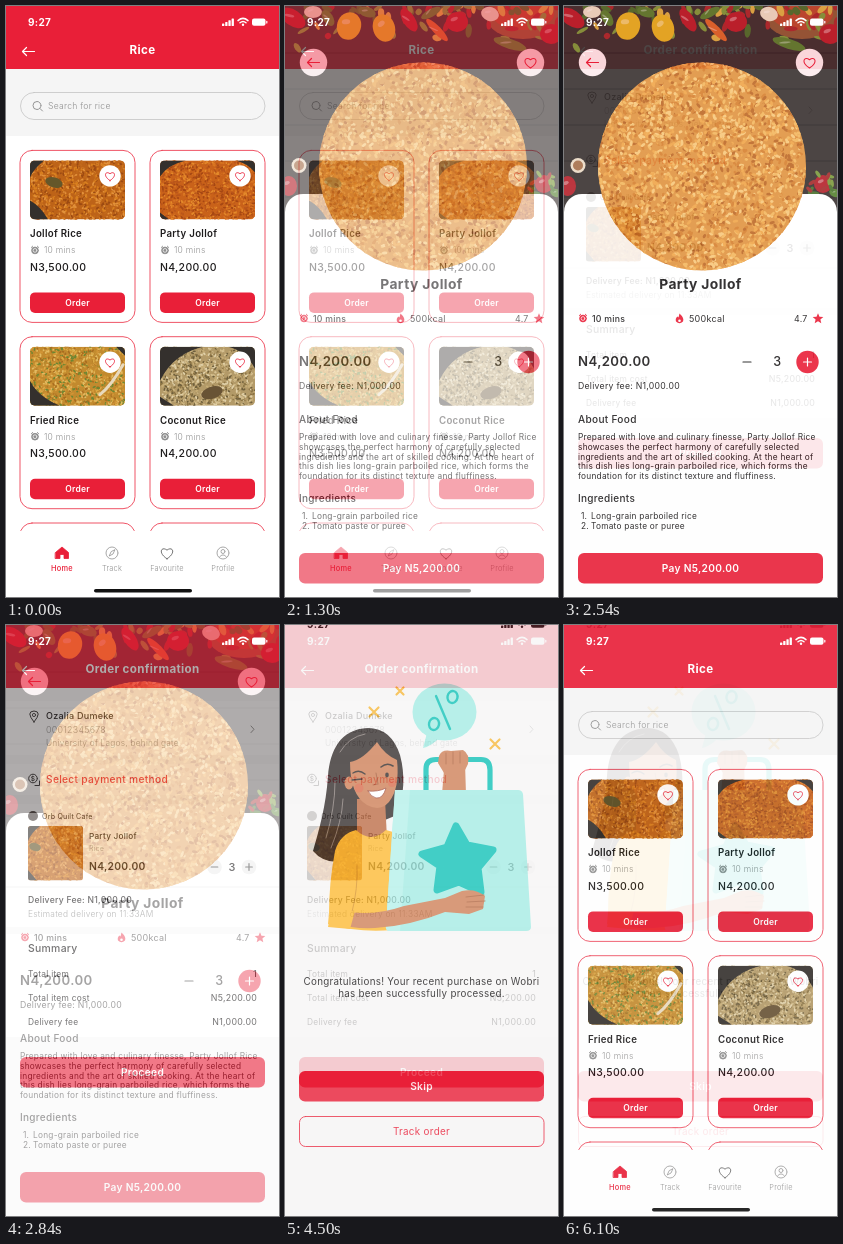
An HTML page with a canvas that plays this animation: 273 px wide and 591 px high, repeating every 6.16 s.

```html
<!DOCTYPE html>
<html lang="en">
<head>
<meta charset="utf-8">
<title>Food ordering screens</title>
<style>
html, body { margin: 0; width: 100%; height: 100%; overflow: hidden; background: #fff; }
canvas { display: block; width: 100%; height: 100%; }
</style>
</head>
<body>
<canvas id="stage"></canvas>
<script>
const W = 273, H = 591;
const HOLD = 1000, STEP = 60, SPAN = 1540;
const RED = '#e91f38', INK = '#1e1c1d', GREY = '#929292', PALE = '#f5f5f5';
const SKIN = '#cf8259', TEAL = '#14c3b8', MINT = '#a6ece4', HAIR = '#37302f', GOLD = '#fdbb36';
const dpr = window.devicePixelRatio || 1;
let g;

function prepare(canvas) {
  canvas.width = Math.round(W * dpr);
  canvas.height = Math.round(H * dpr);
  const ctx = canvas.getContext('2d');
  ctx.scale(dpr, dpr);
  return ctx;
}

function layer(paint) {
  const canvas = document.createElement('canvas');
  g = prepare(canvas);
  g.lineCap = g.lineJoin = 'round';
  paint();
  return canvas;
}

function randomizer(seed) {
  return () => (seed = (seed * 16807) % 2147483647) / 2147483647;
}

function text(s, x, y, size, weight = 400, color = INK, align = 'left') {
  g.font = `${weight} ${size}px Inter, "DejaVu Sans", sans-serif`;
  g.letterSpacing = (size * 0.03).toFixed(2) + 'px';
  g.textAlign = align;
  g.fillStyle = color;
  g.fillText(s, x, y);
}

function ink(p, fill, stroke, width = 1) {
  if (fill) { g.fillStyle = fill; g.fill(p); }
  if (stroke) { g.strokeStyle = stroke; g.lineWidth = width; g.stroke(p); }
}

function path(d, fill, stroke, width) { ink(new Path2D(d), fill, stroke, width); }

function box(x, y, w, h, r, fill, stroke, width) {
  const p = new Path2D();
  p.roundRect(x, y, w, h, r);
  ink(p, fill, stroke, width);
  return p;
}

function oval(x, y, rx, ry, turn, fill, stroke, width) {
  const p = new Path2D();
  p.ellipse(x, y, rx, ry, turn, 0, 7);
  ink(p, fill, stroke, width);
  return p;
}

function disc(x, y, r, fill, stroke, width) { return oval(x, y, r, r, 0, fill, stroke, width); }

function at(x, y, scale, draw) {
  g.save();
  g.translate(x, y);
  g.scale(scale, scale);
  draw();
  g.restore();
}

function inside(p, draw) {
  g.save();
  g.clip(p);
  draw();
  g.restore();
}

// ---- icons ----
function heart(x, y, scale, color, width = 1) {
  at(x, y, scale, () => path('M0 4.4C-8-.6-4.6-6.4 0-2.8C4.6-6.4 8-.6 0 4.4Z', null, color, width));
}

function arrow(x, y, color) {
  path(`M${x + 6} ${y}H${x - 6}M${x - 2} ${y - 4}L${x - 6} ${y}L${x - 2} ${y + 4}`, null, color, 1.2);
}

function sign(x, y, plus, color, r = 4) {
  path(`M${x - r} ${y}H${x + r}` + (plus ? `M${x} ${y - r}V${y + r}` : ''), null, color, 1.2);
}

function star(x, y, r, color) {
  let d = '';
  for (let i = 0; i < 10; i++) {
    const a = i * Math.PI / 5, k = i % 2 ? r * 0.45 : r;
    d += `${i ? 'L' : 'M'}${x + k * Math.sin(a)} ${y - k * Math.cos(a)}`;
  }
  path(d + 'Z', color);
}

function timer(x, y, color) {
  disc(x, y, 3.4, color, color, 0.8);
  disc(x, y, 1.9, null, '#fff', 0.7);
  path(`M${x - 3.6} ${y - 3}l1.2-1.2M${x + 3.6} ${y - 3}l-1.2-1.2`, null, color, 1);
}

function status(color, dy = 0) {
  g.save();
  g.translate(0, dy);
  text('9:27', 22, 20, 10, 700, color);
  for (let i = 0; i < 4; i++) box(216 + i * 3.2, 17.6 - i * 1.7, 2.3, 2.4 + i * 1.7, 0.6, color);
  path('M232 14.6Q237 10.2 242 14.6M234 16.8Q237 14.2 240 16.8', null, color, 1.5);
  disc(237, 18.7, 1.2, color);
  box(246, 12.6, 13.5, 7.2, 2, color);
  box(260.2, 14.8, 1.2, 2.8, 0.6, color);
  g.restore();
}

function header(title) {
  g.fillStyle = RED;
  g.fillRect(0, 0, W, 63);
  status('#fff');
  arrow(22.5, 45.5, '#fff');
  text(title, W / 2, 48, 11.6, 700, '#fff', 'center');
}

function button(label, y, size = 10.2) {
  box(14, y, 245, 30.5, 6, RED);
  text(label, W / 2, y + 18.7, size, 600, '#fff', 'center');
}

// ---- food pictures ----
function grains(x, y, w, h, colors, seed, size = 1.6) {
  const rnd = randomizer(seed);
  g.fillStyle = colors[0];
  g.fillRect(x, y, w, h);
  for (let n = w * h / (size * size * 1.7); n > 0; n--) {
    const c = colors[Math.floor(rnd() * colors.length)];
    oval(x + rnd() * w, y + rnd() * h, size * (0.6 + rnd() * 0.6), size * 0.55, rnd() * 3.1, c);
  }
}

const DISHES = [
  { name: 'Jollof Rice', price: 'N3,500.00', seed: 11,
    colors: ['#bd6318', '#d9801f', '#9c4a12', '#e2913a', '#c26a1b'],
    pan: 'M0 0H14Q3 9 0 17ZM0 40Q11 46 18 59H0Z' },
  { name: 'Party Jollof', price: 'N4,200.00', seed: 23,
    colors: ['#c9621a', '#e48a2b', '#a64713', '#d97622', '#b9551a'],
    pan: 'M0 0H26Q8 4 0 16ZM76 0H95V12Q88 3 76 0ZM0 52L9 59H0Z' },
  { name: 'Fried Rice', price: 'N3,500.00', seed: 37,
    colors: ['#c28a2e', '#dcaa45', '#a86c1f', '#6d8632', '#d29537', '#e3bb62'],
    pan: 'M0 34Q8 50 30 59H0ZM86 0H95V9Z' },
  { name: 'Coconut Rice', price: 'N4,200.00', seed: 53,
    colors: ['#b39a68', '#d3bd8c', '#8c7444', '#c7ad76', '#e0d0a8', '#6f5f3c'],
    pan: 'M0 0H44Q14 6 0 34ZM68 0H95V22Q86 4 68 0ZM0 50L14 59H0Z' }
];

function dishPhoto(dish, x, y) {
  inside(box(x, y, 95, 59, 5), () => {
    grains(x, y, 95, 59, dish.colors, dish.seed);
    at(x, y, 1, () => path(dish.pan, '#34302d'));
    if (dish.seed === 11) oval(x + 24, y + 22, 9, 5, 0.3, '#65572a');
    if (dish.seed === 37) path(`M${x + 70} ${y + 48}Q${x + 82} ${y + 38} ${x + 93} ${y + 18}`, null, '#e8d9bd', 3);
    if (dish.seed === 53) oval(x + 52, y + 46, 11, 6, -0.3, '#685335');
  });
}

function card(dish, x, y) {
  box(x, y, 115, 172, 12, '#fff', '#ee4256', 0.9);
  if (!dish) return;
  dishPhoto(dish, x + 10, y + 10);
  disc(x + 90, y + 25.5, 10.7, '#fff');
  heart(x + 90, y + 26, 0.95, RED, 0.9);
  text(dish.name, x + 10, y + 87, 9.7, 600);
  timer(x + 15, y + 100, '#8f8f8f');
  text('10 mins', x + 24, y + 103, 8.5, 300, GREY);
  text(dish.price, x + 10, y + 120.7, 10.5, 500);
  box(x + 10, y + 142, 95, 20.5, 5, RED);
  text('Order', x + 57.5, y + 155.3, 8.5, 600, '#fff', 'center');
}

// ---- screens ----
function menu() {
  g.fillStyle = '#fff';
  g.fillRect(0, 0, W, H);
  g.fillStyle = PALE;
  g.fillRect(0, 63, W, 67);
  header('Rice');
  box(14.5, 86.5, 244.5, 27, 13.5, null, '#c4c4c4', 0.8);
  disc(31, 99.5, 4, null, '#8a8a8a', 0.9);
  path('M34 102.5L36.5 105', null, '#8a8a8a', 0.9);
  text('Search for rice', 42, 103, 8.6, 300, GREY);
  for (let i = 0; i < 6; i++) card(DISHES[i], 14 + 130 * (i % 2), 144.4 + 186.3 * Math.floor(i / 2));

  g.fillStyle = '#fff';
  g.fillRect(0, 525, W, 66);
  path('M49.5 546.5L56 541L62.500 546.5V552.500H58V548.500H54V552.500H49.500Z', RED, RED, 0.8);
  disc(106, 547, 6, null, GREY, 0.8);
  path('M108.800 544L107 548L103.200 550L105 546Z', null, GREY, 0.8);
  heart(161, 547.5, 1.2, '#6d6d6d', 0.8);
  disc(217, 547, 6, null, GREY, 0.8);
  disc(217, 545.5, 2, null, GREY, 0.8);
  path('M213.500 551Q217 546.500 220.500 551', null, GREY, 0.8);
  ['Home', 'Track', 'Favourite', 'Profile'].forEach((s, i) =>
    text(s, [56, 106, 161, 217][i], 565, 7.4, i ? 300 : 500, i ? GREY : RED, 'center'));
  box(88, 583, 98, 3.6, 1.8, '#111');
}

// x, y, width, height, turn for each colour
const VEG = {
  '#b5202a': [[8, 12, 14, 8, 0.6], [124, 14, 13, 6, 1], [172, 16, 11, 10, 0], [266, 28, 11, 10, 0], [259, 178, 9, 9, 0], [4, 180, 8, 10, 0]],
  '#e3b322': [[64, 20, 12, 14, 0.3], [99, 22, 11, 14, -0.3]],
  '#e9dfc6': [[28, 6, 9, 6, 0], [205, 8, 9, 7, 0.3]],
  '#55802f': [[43, 12, 9, 5, 1], [82, 6, 9, 5, 0.3], [146, 7, 11, 4, -0.5], [225, 38, 17, 5, 0.3], [271, 187, 6, 4, 0.4]],
  '#d8672a': [[152, 24, 15, 4, 0.8]]
};

function vegetables() {
  g.fillStyle = '#38302f';
  g.fillRect(0, 0, W, 215);
  for (let y = 47; y < 200; y += 36) path(`M0 ${y}H${W}`, null, '#292323', 1);
  oval(238, 10, 37, 23, 0, '#8c5a35');
  oval(238, 8, 31, 16, 0, '#b64a2d');
  const rnd = randomizer(71), leaf = ['#48702b', '#7b9a3b', '#a52a2b', '#d9b044'];
  for (let i = 0; i < 75; i++) {
    oval(rnd() * W, rnd() * rnd() * 46, 3 + rnd() * 4, 1.5 + rnd() * 2, rnd() * 3, leaf[i % 4]);
  }
  for (const color in VEG) {
    for (const [x, y, w, h, turn] of VEG[color]) {
      oval(x, y, w, h, turn, color);
      oval(x - w * 0.25, y - h * 0.3, w * 0.35, h * 0.18, turn - 0.4, 'rgba(255,255,255,.35)');
    }
  }
  for (let i = 0; i < 12; i++) oval(243 + rnd() * 30, 168 + rnd() * 22, 4, 1.8, rnd() * 3, leaf[i % 3]);
  disc(14, 159.5, 7.5, '#ead9c4');
  disc(14, 159.5, 5, '#a56e48');
}

function details() {
  g.fillStyle = '#fff';
  g.fillRect(0, 0, W, H);
  vegetables();
  box(0, 188, W, 420, 18, '#fff');
  inside(disc(138, 160.5, 104), () =>
    grains(34, 56, 208, 209, ['#e0933f', '#f3b65c', '#bd6724', '#f0a548', '#f8c779', '#d67f2d'], 97, 2.6));
  status('#fff');
  for (const x of [28.5, 245.5]) disc(x, 56.5, 13.7, '#fdecee');
  arrow(28.5, 56.5, RED);
  heart(245.5, 57, 1.15, RED, 0.9);

  text('Party Jollof', W / 2, 282.5, 13.8, 700, INK, 'center');
  timer(19, 312.500, RED);
  text('10 mins', 28, 315.5, 8.7, 500);
  path('M115.500 307.500Q120.500 312 119 315.500Q115.500 319 112 315.500Q111 312.500 113.500 310.500L114.500 311.500Z', RED);
  disc(115.5, 314.8, 1.3, '#fff');
  text('500kcal', 125, 315.5, 9);
  text('4.7', 230, 315.5, 8.8);
  star(254, 312.8, 5.6, RED);

  text('N4,200.00', 14, 360, 13.2, 600);
  sign(183, 356, false, INK);
  text('3', 213.5, 360.3, 12.6, 500, INK, 'center');
  disc(243.5, 356, 11.2, RED);
  sign(243.5, 356, true, '#fff');
  text('Delivery fee: N1,000.00', 14, 383, 8.7);

  text('About Food', 14, 417.3, 10.1, 500);
  ['Prepared with love and culinary finesse, Party Jollof Rice',
   'showcases the perfect harmony of carefully selected',
   'ingredients and the art of skilled cooking. At the heart of',
   'this dish lies long-grain parboiled rice, which forms the',
   'foundation for its distinct texture and fluffiness.'
  ].forEach((s, i) => text(s, 14, 434 + i * 9.8, 8.3));
  text('Ingredients', 14, 496.3, 10, 500);
  ['Long-grain parboiled rice', 'Tomato paste or puree'].forEach((s, i) => {
    text(i + 1 + '.', 17, 513.2 + i * 9.8, 8.3);
    text(s, 27, 513.2 + i * 9.8, 8.3);
  });
  button('Pay N5,200.00', 547);
}

function confirm() {
  g.fillStyle = '#fafafa';
  g.fillRect(0, 0, W, H);
  g.fillStyle = '#fff';
  for (const [y, h] of [[76, 54], [139, 31], [179, 123], [309, 103]]) g.fillRect(0, y, W, h);
  header('Order confirmation');

  path('M28 97Q19.500 86.500 28 86Q36.500 86.500 28 97Z', null, INK, 0.9);
  disc(28, 90, 1.6, null, INK, 0.8);
  text('Ozalia Dumeke', 40, 94, 9, 500);
  text('00012345678', 40, 107.5, 8.9, 300, GREY);
  text('University of Lagos, behind gate', 40, 121, 8.3, 300, GREY);
  path('M245 101L248 104.300L245 107.600', null, GREY, 1);

  disc(27, 153.5, 4.3, null, INK, 0.9);
  text('$', 27, 156, 6.5, 500, INK, 'center');
  path('M29 160.500H33.500V156', null, INK, 0.9);
  text('Select payment method', 40, 158.2, 10.2, 500, RED);

  disc(27, 191, 5, '#4a4240');
  text('Orb Quilt Cafe', 36, 193.6, 7.1);
  inside(box(22, 201, 55, 54.5, 3), () => {
    grains(22, 201, 55, 54.5, DISHES[0].colors, 29);
    path('M22 201H34Q25 208 22 216ZM22 245L31 255.500H22Z', '#34302d');
    oval(29, 222, 6, 4, 0.3, '#65572a');
  });
  text('Party Jollof', 83, 214, 8.2, 500);
  text('Rice', 83, 226.2, 7.1, 300, GREY);
  text('N4,200.00', 83, 245.3, 10.3, 600);
  for (const x of [208.5, 243]) disc(x, 242, 7.3, '#efefef');
  sign(208.5, 242, false, '#555', 3.3);
  sign(243, 242, true, '#555', 3.3);
  text('3', 226, 246, 11, 500, INK, 'center');
  path(`M0 262H${W}`, null, '#f1f1f1', 1);
  text('Delivery Fee: N1,000.00', 22, 278, 8.6, 500);
  text('Estimated delivery on 11:33AM', 22, 291.5, 8.4, 300, GREY);

  text('Summary', 22, 327, 10.4, 500);
  [['Total item', '1'], ['Total item cost', 'N5,200.00'], ['Delivery fee', 'N1,000.00']].forEach(([k, v], i) => {
    text(k, 22, 352.3 + i * 24, 8.4);
    text(v, 251, 352.3 + i * 24, 8.8, 400, INK, 'right');
  });
  button('Proceed', 432);
}

function shopper() {
  // bubble and sparkles
  path('M142 108L138 123Q147 121 155 112Z', MINT);
  oval(159.5, 87, 32, 28.500, 0, MINT);
  oval(149, 99, 5, 6, 0.2, null, TEAL, 2.4);
  oval(167.5, 72, 5, 6, 0.2, null, TEAL, 2.4);
  path('M151 71L165 104', null, TEAL, 2.4);
  for (const [x, y, r] of [[89, 87, 4.5], [115, 66, 3.5], [210, 119, 4.5]]) {
    path(`M${x - r} ${y - r}L${x + r} ${y + r}M${x + r} ${y - r}L${x - r} ${y + r}`, null, '#f7b93d', 2.2);
  }

  // hair, neck and shirt
  path('M83 103C55 104 45 126 43 151C41 181 34 205 28 226Q38 238 55 237Q74 220 83 202L112 190Q123 160 115 130Q106 103 83 103Z', HAIR);
  path('M72 174L100 174L102 214Q86 224 72 208Z', '#bd6f49');
  path('M71 205Q55 209 50 226Q44 258 44 288L43 299Q73 308 108 305V207L101 205Q86 219 71 205Z', GOLD);
  path('M72 240Q73 264 67 287', null, '#d9952a', 1);

  // face
  path('M65 137Q78 135 92 117Q100 130 112 135Q115 163 104 177Q95 187 82 180Q65 170 65 137Z', SKIN);
  oval(64, 158, 4.5, 6.5, 0, SKIN);
  disc(74, 163, 4.500, '#d96f4f');
  disc(107, 158, 4, '#d96f4f');
  path('M68 148Q74 144 80 149M67 155L77 154', null, HAIR, 1.4);
  path('M96 142Q102 137 108 141', null, HAIR, 1.6);
  oval(102, 150, 1.8, 2.4, 0, HAIR);
  path('M91 148L93 159L88 160', null, '#a95f3d', 1.1);
  path('M83 166Q93 167 101 163Q98 174 91 173Q86 172 83 166Z', '#fff', '#9d493a', 0.8);
  path('M55 127Q64 112 80 109M50 157Q50 183 41 213M58 174Q57 196 46 223', null, '#8f8581', 0.9);

  // raised hand behind the bag
  path('M157 169L159 145L180 137L181 170Z', SKIN);
  path('M141 168V144Q141 134.500 151 134.500H196Q205 134.500 205 145V168', null, TEAL, 5.2);
  path('M154 131Q157 124 166 126L178 125Q185 129 183 139L177 151Q166 155 159 148L153 138Z', SKIN);
  path('M161 128V139M168 127V139M175 127V138', null, '#ad633f', 0.9);

  // bag, badge and front arm
  path('M110 165H233Q237 165 238 169L246 302Q246 306 241 306H105Q100 306 101 300Z', MINT);
  path('M110 165H125L115 306H105Q100 306 101 300Z', '#b6f1ea');
  path('M171 201L182 220L208 225L193 243L196 267L174 257L152 265L155 241L137 229L162 222Z', TEAL, TEAL, 7);
  path('M57 286Q87 292 119 281L160 273L177 266Q190 263 200 271L198 284L184 289L160 287Q125 301 90 303Q68 304 52 299Z', SKIN);
  path('M181 272L199 270M182 277L200 276M181 282L198 282', null, '#ad633f', 0.9);
  path('M48 276Q59 288 70 286L65 304L43 302Z', GOLD);
}

function success() {
  g.fillStyle = '#f7f6f6';
  g.fillRect(0, 0, W, H);
  status(INK, -17);
  shopper();
  text('Congratulations! Your recent purchase on Wobri', W / 2, 360, 9.8, 400, INK, 'center');
  text('has been successfully processed.', W / 2, 372, 9.8, 400, INK, 'center');
  button('Skip', 446);
  box(14.5, 491.5, 244.5, 30, 6, null, RED, 0.9);
  text('Track order', W / 2, 509.7, 9.9, 400, RED, 'center');
}

const screens = [menu, details, confirm, success].map(layer);
const view = prepare(document.getElementById('stage'));

function frame() {
  const t = performance.now() % (SPAN * screens.length);
  const k = Math.floor(t / SPAN), u = t % SPAN;
  view.globalAlpha = 1;
  view.drawImage(screens[k], 0, 0, W, H);
  if (u >= HOLD) {
    view.globalAlpha = (Math.floor((u - HOLD) / STEP) + 1) / 10;
    view.drawImage(screens[(k + 1) % screens.length], 0, 0, W, H);
  }
  requestAnimationFrame(frame);
}
frame();
</script>
</body>
</html>
```
